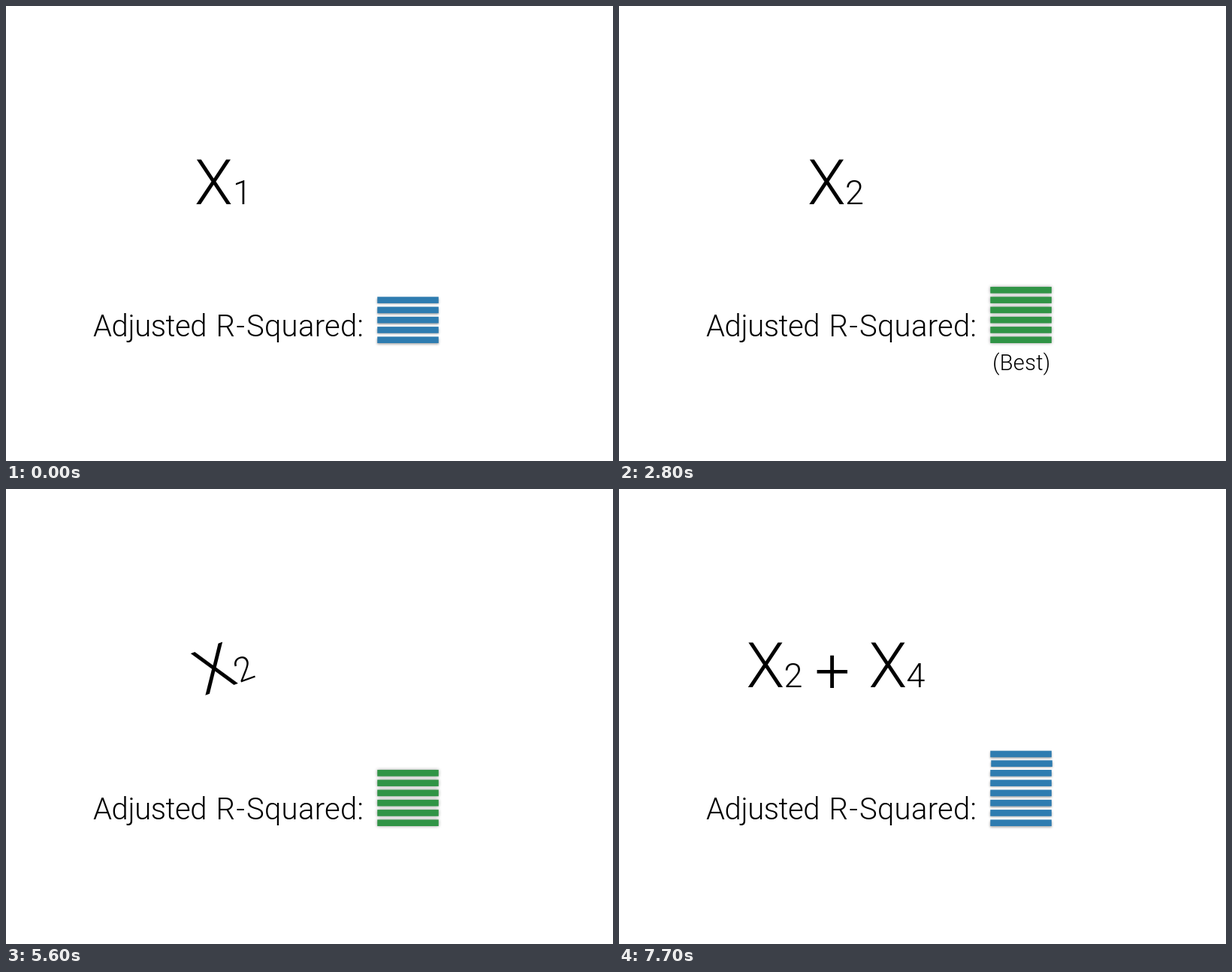
Recreate the animation shown at these times as an HTML page with a canvas. Size 808 by 606 pixels, loop 8000 ms.

```html
<!DOCTYPE html>
<html lang="en">
<head>
<meta charset="utf-8">
<title>Adjusted R-Squared</title>
<style>
html, body { margin: 0; width: 100%; height: 100%; overflow: hidden; background: #fff; }
canvas { display: block; }
</style>
</head>
<body>
<canvas id="stage" width="808" height="606"></canvas>
<script>
const ctx = document.getElementById('stage').getContext('2d');
const LOOP = 8000, STEP = 700, TILT = 20 * Math.PI / 180;
const BASE = 264;

const steps = [
  { a: '1', bars: 5 },
  { a: '2', bars: 6 },
  { a: '3', bars: 4 },
  { a: '4', bars: 3 },
  { a: '2', bars: 6, green: true, best: true },
  { a: '2', bars: 6, green: true, tilt: TILT },
  { a: '2', bars: 6, green: true, tilt: -TILT },
  { a: '2', bars: 6, green: true, tilt: TILT },
  { a: '2', bars: 6, green: true, tilt: -TILT },
  { a: '2', b: '1', bars: 6 },
  { a: '2', b: '3', bars: 7 },
  { a: '2', b: '4', bars: 8 }
];

function setFont(size, spacing = 0) {
  ctx.font = `300 ${size}px Roboto, Inter, sans-serif`;
  ctx.letterSpacing = spacing + 'px';
}

// Text whose visible left edge sits at x
function word(text, size, x, y, spacing) {
  setFont(size, spacing);
  ctx.fillText(text, x + ctx.measureText(text).actualBoundingBoxLeft, y);
}

// Text whose visible shape is centred on x; with middle set, on y as well
function centred(text, size, x, y, middle, spacing) {
  setFont(size, spacing);
  const m = ctx.measureText(text);
  const dx = (m.actualBoundingBoxLeft - m.actualBoundingBoxRight) / 2;
  const dy = middle ? (m.actualBoundingBoxAscent - m.actualBoundingBoxDescent) / 2 : 0;
  ctx.fillText(text, x + dx, y + dy);
}

function variable(index, x) {
  centred('X', 83, x, BASE);
  centred(index, 45, x + (index === '1' ? 35 : 37.5), BASE);
}

function label() {
  word('Adjusted', 40, 116, 440, -0.4);
  word('R-', 40, 282.5, 440, 1.5);
  word('Squared:', 40, 321, 440, 0.3);
}

function bars(count, green) {
  ctx.save();
  ctx.fillStyle = green ? '#309446' : '#2e7cb0';
  ctx.shadowColor = green ? 'rgba(0,0,0,.4)' : 'rgba(0,0,0,.36)';
  ctx.shadowBlur = green ? 4 : 3;
  ctx.shadowOffsetY = green ? 0 : 1.5;
  for (let i = 0; i < count; i++) {
    const y = 440.4 - 13.27 * Math.min(i, 5) - 12.7 * Math.max(i - 5, 0);
    ctx.fillRect(i === 6 ? 495.3 : 494.3, y, 81.5, 8.6);
  }
  ctx.restore();
}

function draw(time) {
  const s = steps[Math.floor((time % LOOP) / STEP)];
  ctx.fillStyle = '#fff';
  ctx.fillRect(0, 0, 808, 606);
  ctx.fillStyle = '#000';
  label();

  if (s.b) {
    variable(s.a, 195);
    centred('+', 83, 284, 243, true);
    variable(s.b, 358);
  } else {
    ctx.save();
    ctx.translate(290, 235);
    ctx.rotate(s.tilt || 0);
    ctx.translate(-290, -235);
    variable(s.a, 276.5);
    ctx.restore();
  }

  if (s.best) centred('(Best)', 29, 536, 485, false, 0.3);
  bars(s.bars, s.green);
}

const start = performance.now();
function tick() {
  draw(performance.now() - start);
  requestAnimationFrame(tick);
}
tick();
</script>
</body>
</html>
```
